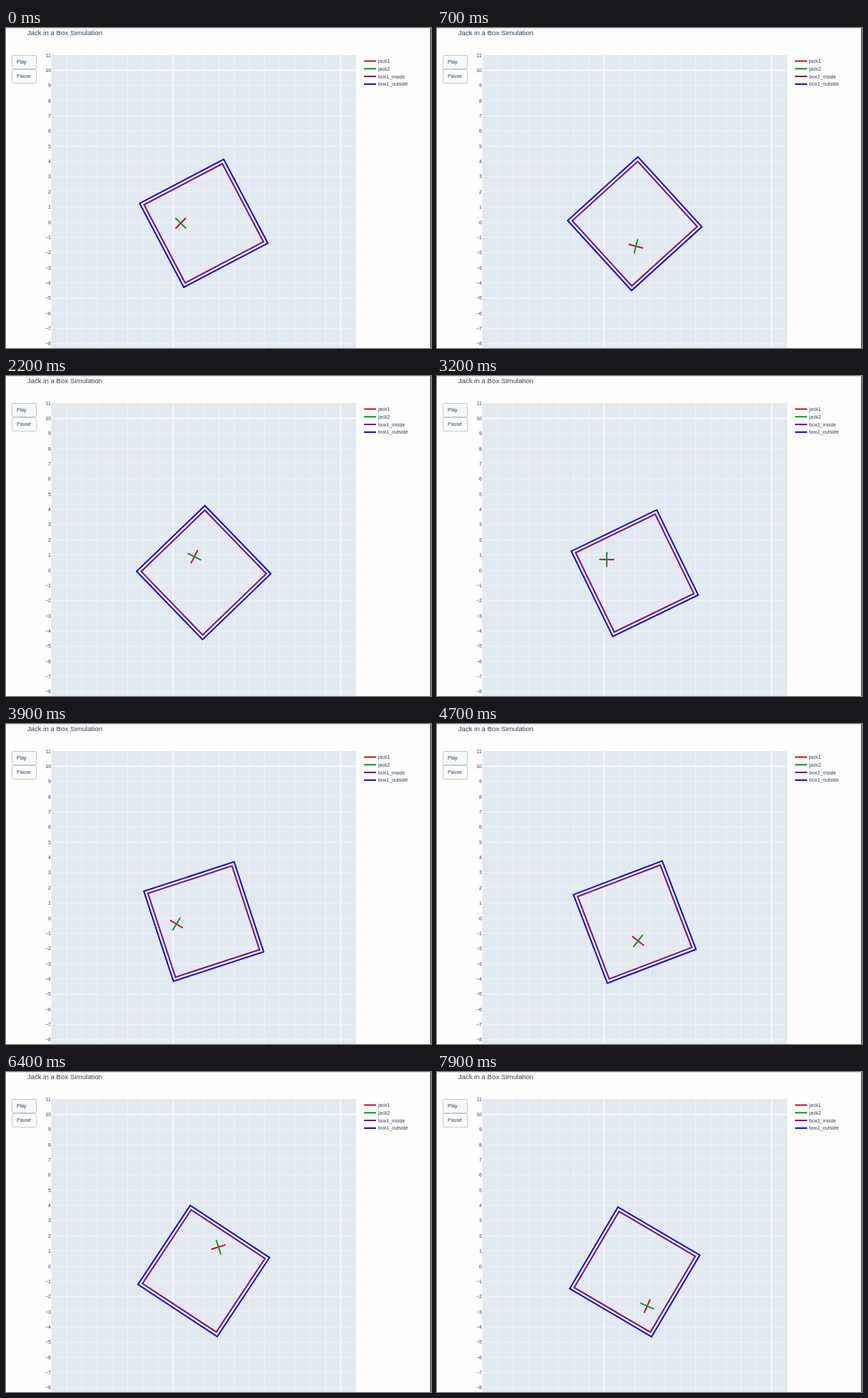
Animation, 596 px wide and 450 px high, one loop 8000 ms. Source, as an HTML page:

```html
<!DOCTYPE html>
<html lang="en">
<head>
<meta charset="utf-8">
<title>Jack in a Box Simulation</title>
<style>
  html, body { margin: 0; width: 100%; height: 100%; overflow: hidden; background: #fefefc; }
  svg { display: block; }
  text { font: 7px "Liberation Sans", Arial, sans-serif; fill: #2a3f5f; }
  .title { font-size: 9.7px; }
  .ticks { text-anchor: end; }
  #box, #jack { fill: none; stroke-width: 2; }
</style>
</head>
<body>
<svg width="596" height="450" viewBox="0 0 596 450">
  <rect width="596" height="1" fill="#dcdddd"/>
  <rect x="595" width="1" height="450" fill="#222"/>
  <text class="title" x="29.7" y="9.5">Jack in a Box Simulation</text>
  <g stroke="#bec8d9">
    <rect x="8.5" y="38.5" width="34" height="19" rx="1" fill="#f4fafc"/>
    <rect x="8.5" y="58.5" width="34" height="19" rx="1" fill="#fefefe"/>
  </g>
  <text x="15" y="49.5">Play</text>
  <text x="15" y="70.3">Pause</text>
  <rect x="63.5" y="38" width="427.5" height="412" fill="#e3e9f0"/>
  <g id="grid" stroke="#fff"></g>
  <g id="ticks" class="ticks"></g>
  <g id="legend"></g>
  <g id="jack">
    <path d="M-10.5 0H10.5" stroke="#cc0a1e"/>
    <path d="M0 -10.5V10.5" stroke="#12901c"/>
  </g>
  <g id="box">
    <rect x="-62" y="-62" width="124" height="124" stroke="#780a78"/>
    <rect x="-66.6" y="-66.6" width="133.2" height="133.2" stroke="#0a0ad2"/>
  </g>
</svg>
<script>
const UNIT = 21.35, ZERO_X = 234.5, ZERO_Y = 273;
const LOOP = 8000, STEP = 100;
const el = id => document.getElementById(id);

function drawChart() {
  let grid = '', ticks = '', legend = '';
  const line = (d, bold) =>
    `<path d="${d}" stroke-width="${bold ? 1.5 : 1}" opacity="${bold ? 0.9 : 0.5}"/>`;
  for (let i = -7; i <= 11; i++) grid += line(`M${ZERO_X + i * UNIT} 38V450`, i % 11 === 0);
  for (let i = -8; i <= 11; i++) {
    const y = ZERO_Y - i * UNIT;
    if (i < 11) grid += line(`M63.5 ${y}H491`, i === 10);
    ticks += `<text x="63" y="${y + 2.5}">${i < 0 ? '−' : ''}${Math.abs(i)}</text>`;
  }
  [['jack1', '#cc0a1e'], ['jack2', '#12901c'], ['box1_inside', '#780a78'], ['box1_outside', '#0a0ad2']]
    .forEach(([name, color], i) => {
      const y = 46.5 + i * 10.8;
      legend += `<path d="M502 ${y}h17" stroke="${color}" stroke-width="2"/>` +
        `<text x="522" y="${y + 2.5}">${name}</text>`;
    });
  el('grid').innerHTML = grid;
  el('ticks').innerHTML = ticks;
  el('legend').innerHTML = legend;
}

// Box swing: time, angle, angular speed
const swing = [
  [0, -27.7, -23], [1.4, -49.2, -1], [2.2, -44, 12], [3.2, -25.9, 19], [4, -18, 0],
  [4.7, -20.9, -18], [6.4, -56.6, -12], [7.3, -60.8, 0], [7.9, -59.5, 5]
];

// Jack flights between bounces
const flights = [
  { t: 0, x: 245, y: 274.5, vx: 48.5, vy: 22.8, g: 67, a: 134, w: 86 },
  { t: 1.03, x: 294.7, y: 334.3, vx: -26.1, vy: -107.8, g: 67, a: 222.5, w: 63.5 },
  { t: 3.66, x: 226.1, y: 282.5, vx: 53.75, vy: -13.2, g: 67, a: 209.5, w: 8.2 },
  { t: 5.03, x: 301, y: 327.3, vx: -2.2, vy: -114, g: 79.9, a: 222, w: 87.8 }
];

function boxAngle(t) {
  const i = Math.max(1, swing.findIndex(k => k[0] >= t));
  const [t0, a0, v0] = swing[i - 1], [t1, a1, v1] = swing[i];
  const d = t1 - t0, s = (t - t0) / d, r = 1 - s;
  return r * r * ((1 + 2 * s) * a0 + s * d * v0) + s * s * ((3 - 2 * s) * a1 - r * d * v1);
}

function place(id, x, y, angle) {
  el(id).setAttribute('transform', `translate(${x} ${y}) rotate(${angle})`);
}

function render(now) {
  const t = Math.floor(now % LOOP / STEP) * STEP / 1000;
  place('box', 277.3, 274.6 + 0.82 * t, boxAngle(t));
  const f = flights.findLast(f => f.t <= t), s = t - f.t;
  place('jack', f.x + f.vx * s, f.y + f.vy * s + f.g * s * s / 2, f.a + f.w * s);
  requestAnimationFrame(render);
}

drawChart();
render(performance.now());
</script>
</body>
</html>
```
